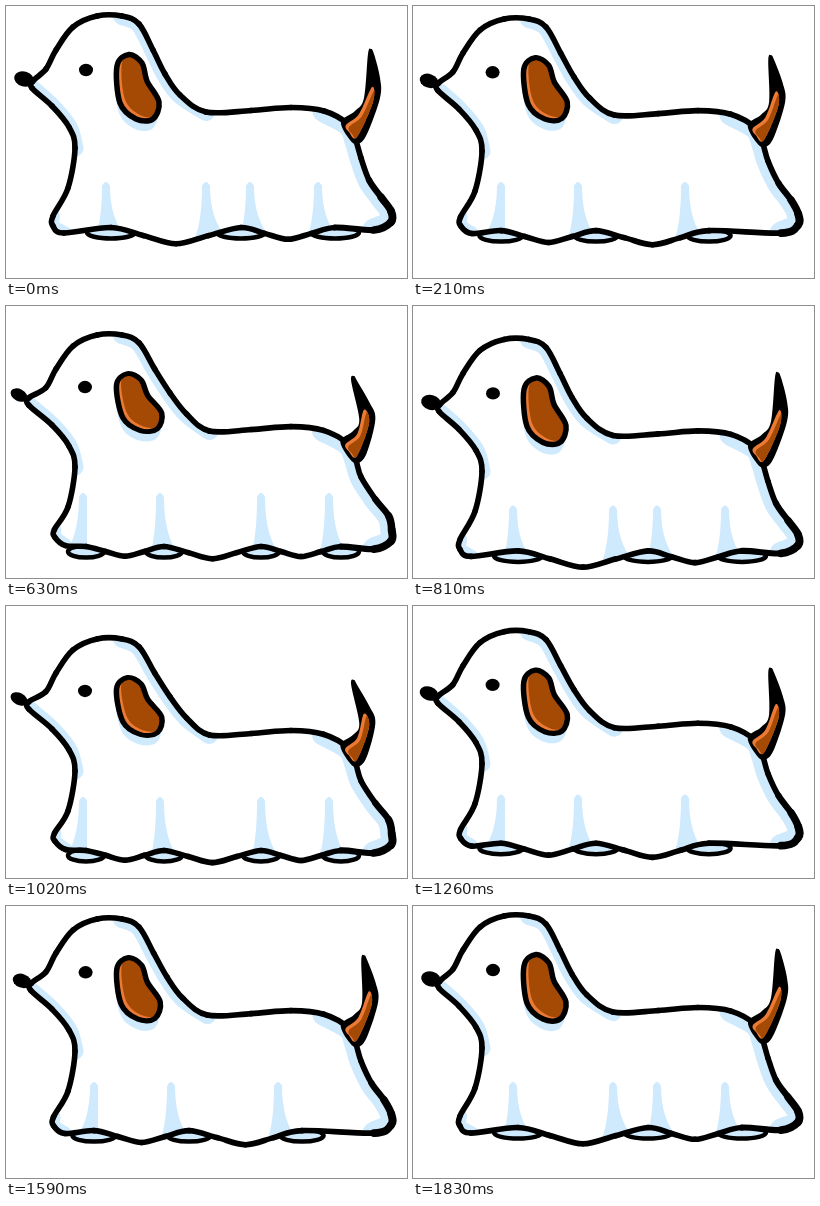
An HTML page that plays this animation: 401x272 px, repeating every 1.86 s.

```html
<!DOCTYPE html>
<html lang="en">
<head>
<meta charset="utf-8">
<title>Floating puppy</title>
<style>
  html, body { margin: 0; width: 100%; height: 100%; overflow: hidden; background: #fff; }
  svg { display: block; width: 401px; height: 272px; }
  .pose { visibility: hidden; }
  .shade { fill: #cfe9fd; }
  .rim { fill: none; stroke: #cfe9fd; stroke-linecap: round; stroke-linejoin: round; }
  .ink { fill: none; stroke: #000; stroke-linecap: round; }
  .foot { fill: #cfe9fd; stroke: #000; stroke-width: 4.5; }
  .brown { fill: #a54a05; }
  .glow { fill: #ec7a35; }
</style>
</head>
<body>
<svg viewBox="0 0 401 272"><g id="dog"></g></svg>
<script>
const STEP = 30, FRAMES = 62, BOB_FRAMES = 60, HOLD = 4, LIFT = 24;
const HEM = 221.5;

// Key points of the dog at rest, shared by all poses.
const BACK = parse('27,75 40,63 50,44 67,21 91,10 116,10 133,18 147,44 159,68 174,89 200,106 245,104.5 285,101.5 318,105 343,119');
const RUMP = parse('350,135 355,152 363,174 375,191 385,205 385,216 368,224');
const FRONT = parse('58,227 47,220 47,210 62,182 69,142 63,121 46,100 26,82');
const EAR = parse('111,60 123,48.5 136,57 141,75 153,96 147,113 130,113 114,97');
const TAIL = parse('335,116 349,105 358,92 362,48 365,43 368,48 374,72 374,92 361,128 352,138 344,134');
const TAIL_TIP = parse('366,81 367,96 351,131 343,126 340,119 353,108');

// Soft pulls that turn the rest shape into the swaying one.
const PULLS = [
  { x: 20, y: 75, r: 14, dx: -5, dy: -3 },
  { x: 178, y: 80, r: 40, dx: 7, dy: 0 },
  { x: 365, y: 45, r: 42, dx: -17, dy: 8 },
  { x: 372, y: 182, r: 16, dx: 11, dy: 0 },
  { x: 50, y: 222, r: 20, dx: 2, dy: -8 }
];

const poses = [
  { sway: 0, feet: [105, 235, 329], legs: [100, 200, 244, 312] },
  { sway: 0.4, feet: [88, 183, 296], legs: [88, 165, 272] },
  { sway: 1, feet: [80, 158, 255, 335], legs: [77, 154, 255, 323] }
];

function parse(text) {
  return text.split(' ').map(pair => pair.split(',').map(Number));
}

const near = (x, y, cx, cy, r) => Math.exp(-((x - cx) ** 2 + (y - cy) ** 2) / r ** 2);

function bend(pts, sway) {
  return pts.map(([x, y]) => PULLS.reduce(([bx, by], p) => {
    const k = sway * near(x, y, p.x, p.y, p.r);
    return [bx + k * p.dx, by + k * p.dy];
  }, [x, y]));
}

// The hem rises over each foot and sags between feet, deeper over wide gaps.
function hem(feet) {
  return feet.flatMap((x, i) => {
    const gap = feet[i + 1] - x;
    const sag = [0.25, 0.5, 0.75].map(u =>
      [x + gap * u, HEM + gap / 16 * (1 - Math.cos(2 * Math.PI * u))]);
    return gap ? [[x, HEM], ...sag] : [[x, HEM]];
  }).reverse();
}

// Smooth curve through the points, as a list of cubic pieces.
function pieces(pts, closed) {
  const n = pts.length;
  const at = i => closed ? pts[(i + n) % n] : pts[Math.max(0, Math.min(n - 1, i))];
  const grip = (p, q, r) => p.map((v, k) => v + (r[k] - q[k]) / 6);
  return Array.from({ length: closed ? n : n - 1 }, (_, i) => {
    const [a, b, c, d] = [at(i - 1), at(i), at(i + 1), at(i + 2)];
    return { from: b, to: c, curve: `C${grip(b, a, c)} ${grip(c, d, b)} ${c}` };
  });
}

const smooth = (pts, closed = true) =>
  'M' + pts[0] + pieces(pts, closed).map(p => p.curve).join('') + (closed ? 'Z' : '');

// Ink line that swells around the heel.
function outline(pts) {
  return pieces(pts, true).map(({ from, to, curve }) => {
    const w = 5.6 + 2.4 * near((from[0] + to[0]) / 2, (from[1] + to[1]) / 2, 384, 212, 30);
    return `<path class="ink" stroke-width="${w}" d="M${from}${curve}"/>`;
  }).join('');
}

const rim = (pts, w) => `<path class="rim" stroke-width="${w}" d="${smooth(pts, false)}"/>`;

const ellipse = (cx, cy, rx, ry, extra = '') =>
  `<ellipse cx="${cx}" cy="${cy}" rx="${rx}" ry="${ry}" ${extra}/>`;

// Shaded fold above a leg; the foremost fold sweeps forward, the others back.
function fold(x, sway) {
  const top = 176 - 8 * sway, bottom = 232;
  const [left, right] = x < 95 ? [21, 4] : [11, 21];
  return `<path class="shade" d="M${x - left},${bottom}Q${x - 4},${bottom - 18} ${x - 4},${top + 4}` +
    `Q${x},${top - 4} ${x + 4},${top + 4}Q${x + 4},${bottom - 18} ${x + right},${bottom}Z"/>`;
}

// Brown part with a bright edge on its lower left.
function lit(d, id, dx, dy) {
  return `<clipPath id="${id}"><path d="${d}"/></clipPath><path class="glow" d="${d}"/>
    <g clip-path="url(#${id})"><path class="brown" transform="translate(${dx} ${dy})" d="${d}"/></g>`;
}

function drawPose({ sway, feet, legs }, i) {
  const [back, rump, front, tail, tip] =
    [BACK, RUMP, FRONT, TAIL, TAIL_TIP].map(pts => bend(pts, sway));
  const body = [...back, ...rump, ...hem(feet), ...front];
  const shape = smooth(body), ear = smooth(EAR);
  const tilt = `translate(${122 - 1.5 * sway} 50) rotate(${-6 * sway}) scale(1 ${1 - 0.1 * sway}) translate(-122 -50)`;
  const [nx, ny] = [18 - 5 * sway, 73 - 3 * sway];
  return `<g class="pose">
    <clipPath id="body${i}"><path d="${shape}"/></clipPath>
    ${feet.map(x => ellipse(x, HEM + 5, 24 - 6 * sway, 6, 'class="foot"')).join('')}
    <path fill="#fff" d="${shape}"/>
    <g clip-path="url(#body${i})">
      ${rim(back.slice(5, 11), 18)}
      ${rim(front.slice(4), 17)}
      ${rim(front.slice(0, 3), 14)}
      ${rim([...back.slice(-2), ...rump], 23)}
      ${legs.map(x => fold(x, sway)).join('')}
      <path class="shade" transform="translate(-1 10) ${tilt}" d="${ear}"/>
    </g>
    ${outline(body)}
    <path d="${smooth(tail)}"/>
    ${lit(smooth(tip), 'tip' + i, 3, 2)}
    <g transform="${tilt}">
      ${lit(ear, 'ear' + i, 5, -3.5)}
      <path class="ink" stroke-width="5.5" d="${ear}"/>
    </g>
    ${ellipse(80 - sway, 64 - 2 * sway, 7, 6.2)}
    ${ellipse(nx, ny, 10 - sway, 7.5 - 1.5 * sway, `transform="rotate(${15 + 12 * sway} ${nx} ${ny})"`)}
  </g>`;
}

const dog = document.getElementById('dog');
dog.innerHTML = poses.map(drawPose).join('');
const drawings = [...dog.children];
const start = performance.now();

function render(now) {
  const frame = Math.floor(Math.max(0, now - start) / STEP) % FRAMES;
  const bob = LIFT / 2 * (1 - Math.cos(2 * Math.PI * frame / BOB_FRAMES));
  const shown = Math.floor(frame / HOLD) % poses.length;
  dog.setAttribute('transform', `translate(0 ${bob.toFixed(2)})`);
  drawings.forEach((d, i) => { d.style.visibility = i === shown ? 'visible' : 'hidden'; });
  requestAnimationFrame(render);
}
render(start);
</script>
</body>
</html>
```
